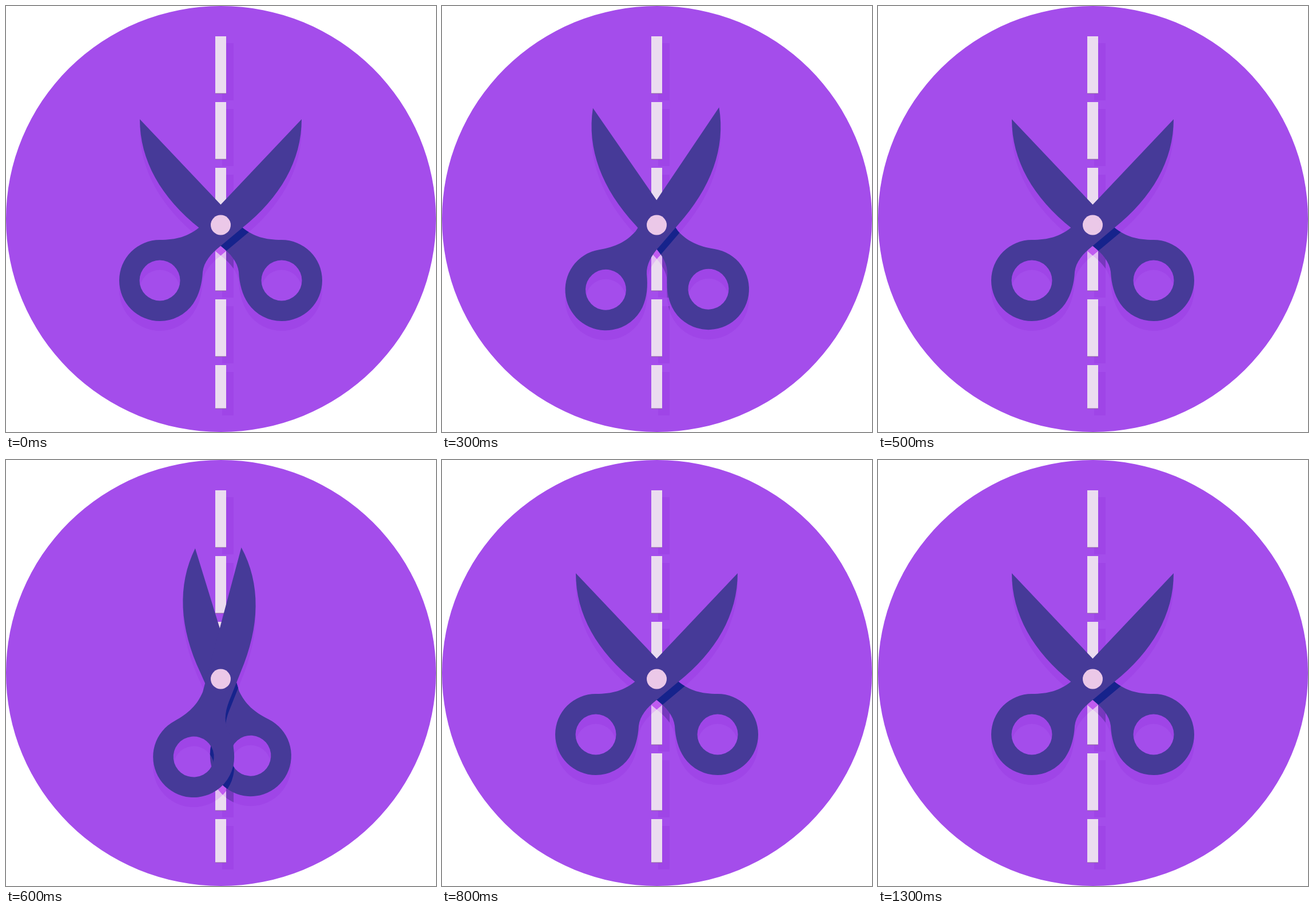
An HTML page with a canvas that plays this animation: 752x745 px, repeating every 1400 ms.

```html
<!DOCTYPE html>
<html lang="en">
<head>
<meta charset="utf-8">
<title>Scissors</title>
<style>
html, body { margin: 0; width: 100%; height: 100%; overflow: hidden; background: #fff; }
canvas { display: block; }
</style>
</head>
<body>
<canvas id="stage" width="752" height="745"></canvas>
<script>
const ctx = document.getElementById('stage').getContext('2d');
const LOOP = 1400, STEP = 100;
const PIVOT = { x: 375.5, y: 383 };
const DROP = 17;
const MAX_ANGLE = 38 * Math.PI / 180;
const COLOR = {
  disc: '#a44deb', shade: '#9f45e7', dash: '#ebdcf0', dashEdge: '#8e62a0',
  dashShade: '#e3bdf3', dashDeep: '#c05bf0', overlap: '#7638bd',
  blade: '#463a98', bladeShade: '#16238c', pin: '#ebc8e8'
};

// One half of the scissors, open: blade to the upper right, ring at the lower left
const half = new Path2D();
half.moveTo(517, 198);
half.lineTo(337, 388);
half.bezierCurveTo(318, 403, 298, 409, 269, 409);
half.arc(269, 480, 71, -Math.PI / 2, 0.61, true);
half.bezierCurveTo(338, 505, 343, 485, 344, 465);
half.bezierCurveTo(346, 448, 358, 433, 375.5, 419.5);
half.lineTo(412, 389);
half.bezierCurveTo(480, 335, 517, 270, 517, 198);
half.closePath();
half.moveTo(304.5, 480);
half.arc(269, 480, 35.5, 0, Math.PI * 2);

const dashes = new Path2D();
const dashShadow = new Path2D();
const dashEnds = [];
for (let y = 53; y < 704; y += 115) {
  const h = Math.min(100, 704 - y);
  dashes.rect(366, y, 19, h);
  dashShadow.rect(378, y + 12, 20, h);
  dashEnds.push(y + h);
}

function turned(angle, flip, dy) {
  const m = new DOMMatrix()
    .translate(PIVOT.x, PIVOT.y + dy)
    .rotate(angle * 180 / Math.PI)
    .scale(flip, 1)
    .translate(-PIVOT.x, -PIVOT.y);
  const p = new Path2D();
  p.addPath(half, m);
  return p;
}

function fill(path, color, ...clips) {
  ctx.save();
  for (const c of clips) ctx.clip(c, 'evenodd');
  ctx.fillStyle = color;
  ctx.fill(path, 'evenodd');
  ctx.restore();
}

// Two snips of 250 ms: 150 ms to close, 100 ms to open
function closing(t) {
  if (t < 250 || t >= 750) return 0;
  const u = (t - 250) % 250;
  return u < 150
    ? Math.sin(Math.PI / 2 * u / 150) ** 2
    : Math.cos(Math.PI / 2 * (u - 150) / 100) ** 2;
}

function disc(x, y, rx, ry, color) {
  ctx.beginPath();
  ctx.ellipse(x, y, rx, ry, 0, 0, Math.PI * 2);
  ctx.fillStyle = color;
  ctx.fill();
}

function draw(t) {
  const angle = closing(t) * MAX_ANGLE;
  const front = turned(-angle, 1, 0);
  const back = turned(angle * 0.925, -1, 0);
  const frontShadow = turned(-angle, 1, DROP);
  const backShadow = turned(angle * 0.925, -1, DROP);

  ctx.fillStyle = '#fff';
  ctx.fillRect(0, 0, 752, 745);
  disc(376, 372.5, 376, 372.5, COLOR.disc);

  fill(dashShadow, COLOR.shade);
  for (const s of [frontShadow, backShadow]) {
    fill(s, COLOR.shade);
    fill(s, COLOR.overlap, dashShadow);
  }

  fill(dashes, COLOR.dash);
  ctx.fillStyle = COLOR.dashEdge;
  for (const y of dashEnds) ctx.fillRect(366, y - 0.5, 19, 1);
  fill(frontShadow, COLOR.dashShade, dashes);
  fill(backShadow, COLOR.dashShade, dashes);
  fill(backShadow, COLOR.dashDeep, dashes, frontShadow);

  fill(back, COLOR.blade);
  fill(frontShadow, COLOR.bladeShade, back);
  fill(front, COLOR.blade);
  disc(PIVOT.x, PIVOT.y, 17.5, 17.5, COLOR.pin);
}

const start = performance.now();
function tick() {
  const t = (performance.now() - start) % LOOP;
  draw(Math.floor(t / STEP) * STEP);
  requestAnimationFrame(tick);
}
tick();
</script>
</body>
</html>
```
